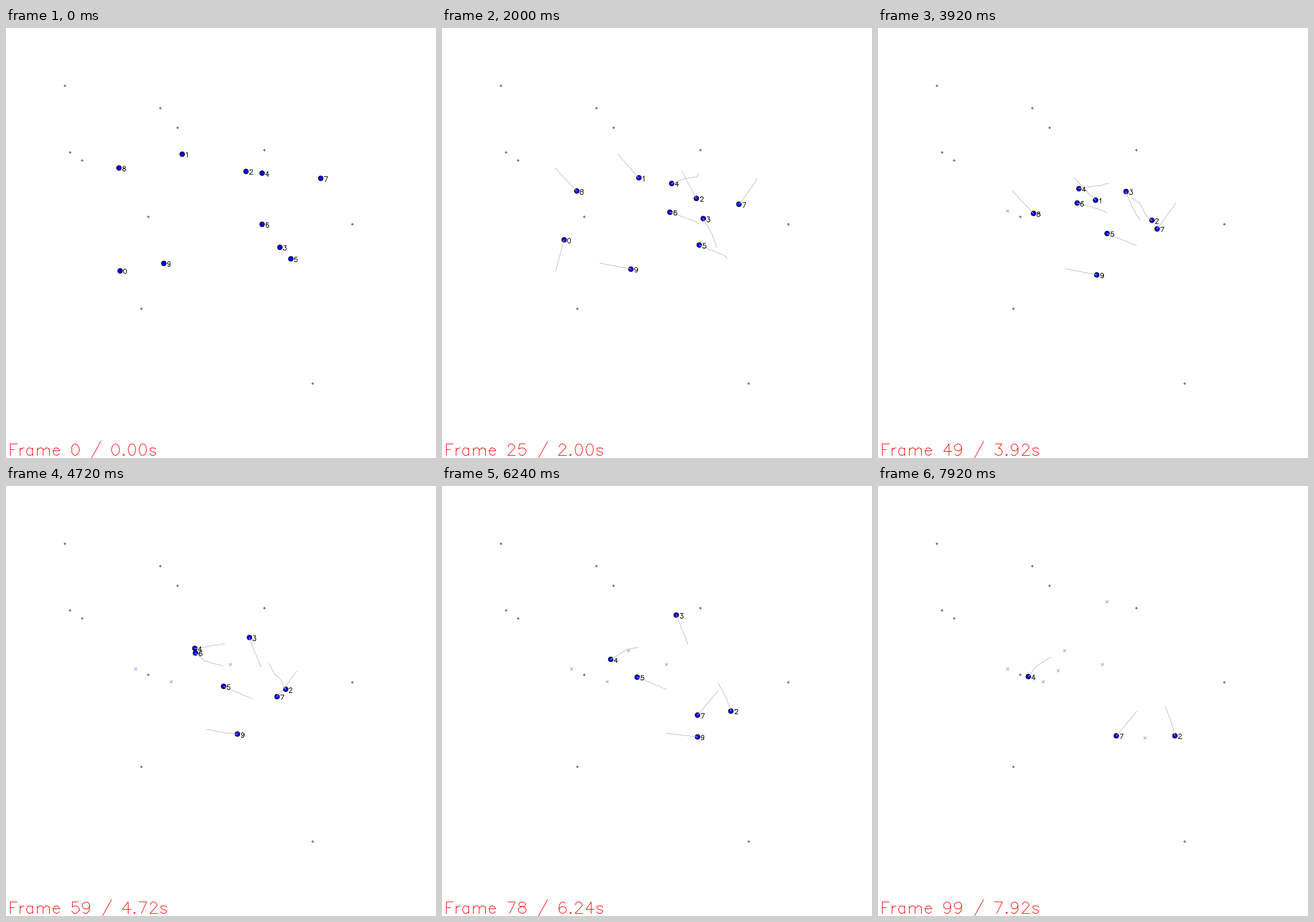
Write a matplotlib script that moves like this. It is 748 px wide and 748 px high and loops after 8000 ms.

```python
import numpy as np
import matplotlib.pyplot as plt
from matplotlib.animation import FuncAnimation
from matplotlib.collections import LineCollection
from matplotlib.patches import Circle, Polygon

SIZE, DPI = 748, 100
PX = 72 / DPI
FRAMES, STEP_MS = 100, 80
SPEED = 2.21         # pixels per frame
ARRIVAL = 4          # distance at which a walker has arrived
TRAIL = 25           # trail length in frames


# Single-stroke lettering: units with the baseline at 0 and capitals 21 high.
def arc(cx, cy, rx, ry, start=0, end=360):
    a = np.radians(np.linspace(start, end, 13))
    return list(zip(cx + rx * np.cos(a), cy + ry * np.sin(a)))


def hump(x):
    return [(x, 10)] + arc(x + 6.5, 9.5, 4.5, 4.5, 130, 0) + [(x + 11, 0)]


STEM = [(4, 14), (4, 0)]
SIX = arc(11, 11, 7, 10, 50, 180) + arc(10.5, 6.5, 6.5, 6.5, 180, 540)
GLYPHS = {
    "F": [[(17, 21), (4, 21), (4, 0)], [(4, 11), (12, 11)]],
    "r": [STEM, arc(12, 7, 8, 7, 172, 90)],
    "a": [[(15, 14), (15, 0)], arc(9.5, 7, 6.5, 7, 35, 325)],
    "m": [STEM, hump(4), hump(15)],
    "e": [[(3, 8), (15, 8)] + arc(9.3, 7, 6.3, 7, 8, 325)],
    "s": [arc(8.5, 10.7, 5.5, 3.3, 10, 250) + arc(8.5, 3.5, 5.5, 3.5, 70, -170)],
    "/": [[(20, 25), (2, -7)]],
    ".": [arc(5, 1, 1, 1)],
    " ": [],
    "0": [arc(10, 10.5, 7, 10.5)],
    "1": [[(6, 17), (8, 18), (11, 21), (11, 0)]],
    "2": [arc(10, 15.5, 6, 5.5, 175, -20) + [(3, 0), (17, 0)]],
    "3": [[(5, 21), (16, 21), (10, 13)] + arc(10, 6.5, 7, 6.5, 85, -160)],
    "4": [[(13, 0), (13, 21), (3, 7), (18, 7)]],
    "5": [[(15, 21), (5, 21), (4, 12)] + arc(10, 7, 7, 7, 125, -155)],
    "6": [SIX],
    "7": [[(3, 21), (17, 21), (7, 0)]],
    "8": [arc(10, 16.7, 6, 4.3), arc(10, 6.2, 7, 6.2)],
    "9": [[(20 - x, 21 - y) for x, y in SIX]],
}
ADVANCE = dict(zip("Frames/. ", (18, 13, 19, 30, 18, 17, 22, 10, 16)))


def pixel(points):
    """Snap points to pixel centres."""
    return np.floor(np.asarray(points, float)) + 0.5


def lettering(text, x, y, scale):
    strokes = []
    for char in text:
        for stroke in GLYPHS[char]:
            strokes.append(pixel(np.array(stroke) * (scale, -scale) + (x + 0.5, y + 0.5)))
        x += ADVANCE.get(char, 20) * scale
    return strokes


class Walker:
    """Walks from point to point at a steady speed until it nears the last one."""

    def __init__(self, *points, speed=SPEED):
        self.points = np.array(points, float)
        legs = np.hypot(*np.diff(self.points, axis=0).T)
        self.reached = np.concatenate([[0], np.cumsum(legs)])
        self.speed = speed

    def at(self, frame):
        walked = np.asarray(frame) * self.speed
        return np.stack([np.interp(walked, self.reached, axis)
                         for axis in self.points.T], axis=-1)

    def arrived(self, frame):
        return self.reached[-1] - frame * self.speed < ARRIVAL


# Most head straight for their goal; the others sidestep a neighbour first.
walkers = [
    Walker((198, 422), (225.5, 318)),
    Walker((306, 219), (358.5, 280), (390, 310.5)),
    Walker((417.5, 249), (441, 295), (455, 305), (468, 328), (476, 334.5),
           (496, 372.5), (510, 410), (520, 448), speed=2.16),
    Walker((476, 381), (477.5, 378.5), (467, 353), (441.5, 310.5), (398.5, 201)),
    Walker((445.5, 252.5), (446, 256), (443, 259), (424, 261.5), (388, 274),
           (378, 274.5), (322, 284), (275.5, 313.5), (249, 348), speed=2.12),
    Walker((495, 401.5), (495.5, 399.5), (493, 396.5), (398.5, 357.5), (313, 321)),
    Walker((445.5, 341.5), (445.5, 338.5), (374.5, 312), (346.5, 305), (324.5, 286)),
    Walker((547.5, 261.5), (548, 264), (486, 349), (401, 451)),
    Walker((196.5, 243.5), (287, 340.5)),
    Walker((274.5, 409), (382, 429.5), (464, 438.5)),
]

POSTS = [(102, 100), (268, 139), (298, 173), (111, 216), (132, 230),
         (449, 212), (247, 328), (602, 341), (235, 488), (533, 618)]

fig = plt.figure(figsize=(SIZE / DPI, SIZE / DPI), dpi=DPI, facecolor="white")
ax = fig.add_axes([0, 0, 1, 1])
ax.set(xlim=(0, SIZE), ylim=(SIZE, 0))
ax.axis("off")


def line_layer(color, zorder):
    layer = LineCollection([], colors=color, linewidths=PX, zorder=zorder,
                           capstyle="projecting", joinstyle="round")
    layer.set_snap(False)
    return ax.add_collection(layer, autolim=False)


for post in POSTS:
    cx, cy = pixel(post)
    corners = [(cx - 2.5, cy), (cx, cy - 2.5), (cx + 2.5, cy), (cx, cy + 2.5)]
    ax.add_patch(Polygon(corners, facecolor="#808080", lw=0, snap=False))

crosses = line_layer("#9090f4", 2)
trails = line_layer("#c0c0c0", 4)
labels = line_layer("black", 5)
caption = line_layer("red", 6)
dots = [ax.add_patch(Circle((0, 0), 4.2, facecolor="#0000ff", edgecolor="black",
                            linewidth=PX, snap=False, zorder=3))
        for _ in walkers]


def draw(frame):
    cross_lines, trail_lines, label_lines = [], [], []
    for number, (walker, dot) in enumerate(zip(walkers, dots)):
        gone = walker.arrived(frame)
        dot.set_visible(not gone)
        if gone:
            x, y = pixel(walker.points[-1])
            cross_lines += [[(x - 2, y - 2), (x + 2, y + 2)],
                            [(x - 2, y + 2), (x + 2, y - 2)]]
            continue
        x, y = walker.at(frame)
        dot.set_center(pixel((x, y)))
        label_lines += lettering(str(number), x + 4.5, y + 5, 0.4)
        if frame:
            trail_lines.append(pixel(walker.at(np.arange(max(0, frame - TRAIL), frame + 1))))
    crosses.set_segments(cross_lines)
    trails.set_segments(trail_lines)
    labels.set_segments(label_lines)
    seconds = frame * STEP_MS / 1000
    caption.set_segments(lettering(f"Frame {frame} / {seconds:.2f}s", 3, 743, 0.945))
    return [crosses, trails, labels, caption, *dots]


animation = FuncAnimation(fig, draw, frames=FRAMES, interval=STEP_MS, repeat=True)
plt.show()
```
